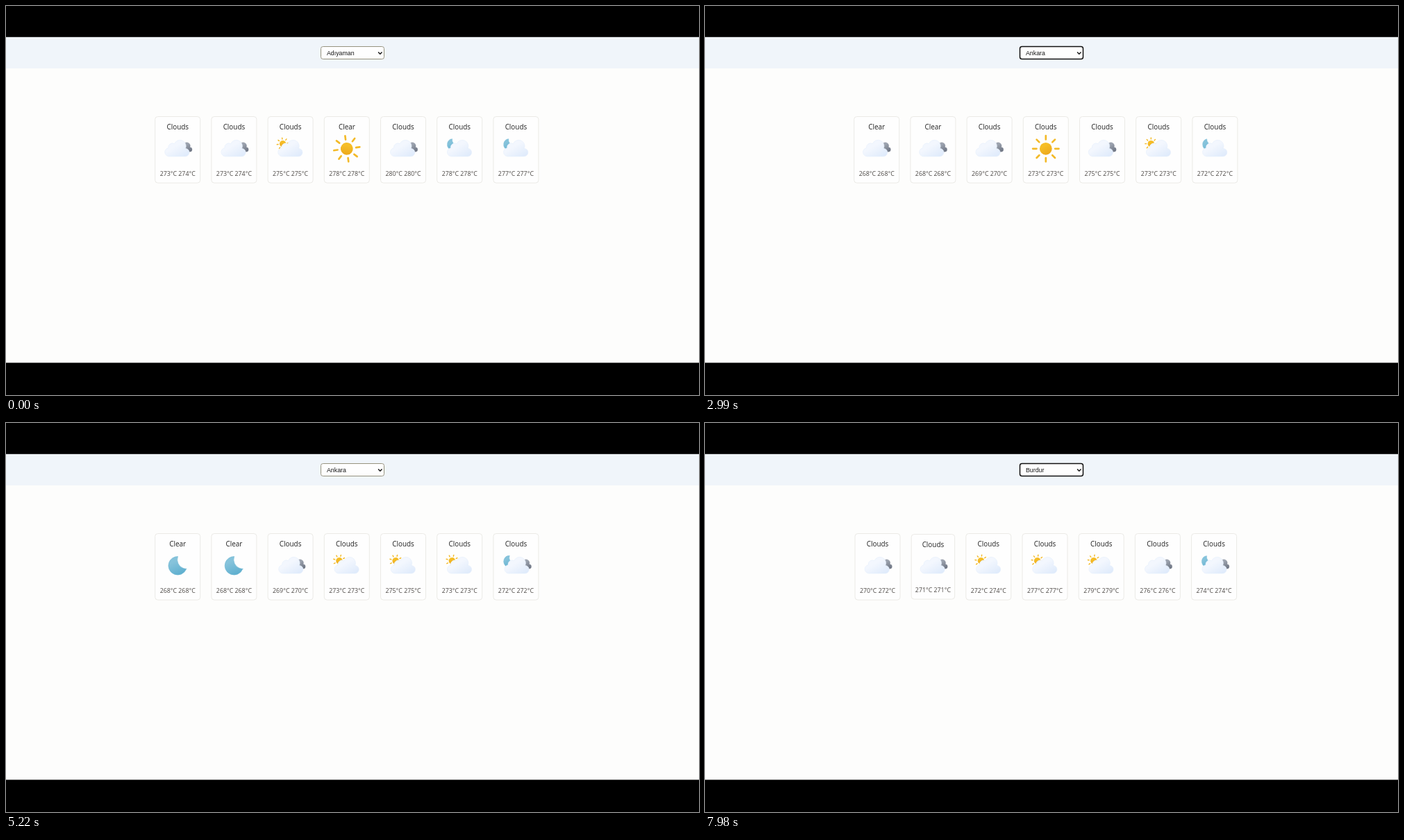
These frames come from a looping animation (998x561 px, 8000 ms). An HTML page with a canvas:

```html
<!DOCTYPE html>
<html lang="en">
<head>
<meta charset="utf-8">
<title>Weather</title>
<style>
  html, body { margin: 0; width: 100%; height: 100%; overflow: hidden; background: #000; }
  canvas { display: block; width: 998px; height: 561px; }
</style>
</head>
<body>
<canvas id="stage"></canvas>
<script>
const W = 998, H = 561, LOOP = 8000, CYCLE = 6000;
const ROW_X = 490.8, GAP = 16.2, CARD_W = 65, ICON_Y = 205.8;
const UNIT = 0.1035;   // icon units (512 box) to pixels

const canvas = document.getElementById('stage');
const dpr = window.devicePixelRatio || 1;
canvas.width = Math.round(W * dpr);
canvas.height = Math.round(H * dpr);
const ctx = canvas.getContext('2d');

const CLOUD = new Path2D('M291 107A84 84 0 00135.6 43 56 56 0 0051.8 100 60 60 0 0063 219H287a56 56 0 000-112Z');

// disc of radius 132 with a round bite taken out of the upper right
const MOON = new Path2D();
MOON.arc(0, 0, 132, 0.26, -1.65);
MOON.arc(118, -100, 133, -2.9, 1.46, true);
MOON.closePath();

function gradient(x0, y0, x1, y1, from, to) {
  const g = ctx.createLinearGradient(x0, y0, x1, y1);
  g.addColorStop(0.25, from);
  g.addColorStop(1, to);
  return g;
}
const WHITE = gradient(99, 30, 232, 260, '#f3f7fe', '#deeafb');
const DARK = gradient(99, 30, 232, 260, '#9ca3af', '#6b7280');
const BLUE = gradient(-85, -110, 48, 121, '#86c3db', '#5eafcf');
const GOLD = gradient(-0.5, -0.9, 0.5, 0.9, '#f6be27', '#eca81c');

// each card: title, icon, low, high
const scenes = [
  {
    from: 0, phase: 5000, city: 'Adıyaman',
    cards: ['Clouds over 273 274', 'Clouds over 273 274', 'Clouds sunCloud 275 275', 'Clear sun 278 278',
      'Clouds over 280 280', 'Clouds moonCloud 278 278', 'Clouds moonCloud 277 277']
  },
  {
    from: 2990, phase: 0, city: 'Ankara', focusEnd: 3820,
    loading: ['over', 'over', 'over', 'sun', 'over', 'sunCloud', 'moonCloud'],
    cards: ['Clear moon 268 268', 'Clear moon 268 268', 'Clouds over 269 270', 'Clouds sunCloud 273 273',
      'Clouds sunCloud 275 275', 'Clouds sunCloud 273 273', 'Clouds overNight 272 272']
  },
  {
    from: 6910, phase: 0, city: 'Burdur', focusEnd: LOOP,
    cards: ['Clouds over 270 272', 'Clouds over 271 271', 'Clouds sunCloud 272 274', 'Clouds sunCloud 277 277',
      'Clouds sunCloud 279 279', 'Clouds over 276 276', 'Clouds overNight 274 274']
  }
];

// goes -1, 1, -1 in straight lines over one cycle
const swing = ms => 1 - 2 * Math.abs(1 - 2 * ((ms % CYCLE) / CYCLE));
const turn = ms => (ms % CYCLE) / CYCLE * Math.PI / 4;

function at(x, y, scale, angle, draw) {
  ctx.save();
  ctx.translate(x, y);
  ctx.rotate(angle);
  ctx.scale(scale, scale);
  draw();
  ctx.restore();
}

function shape(path, fill, line) {
  ctx.fillStyle = fill;
  ctx.fill(path);
  ctx.strokeStyle = line;
  ctx.lineWidth = 6;
  ctx.stroke(path);
}

const cloud = x => at(x, 145, 1, 0, () => shape(CLOUD, WHITE, '#e6effc'));
const darkCloud = x => at(x, 174, 0.572, 0, () => shape(CLOUD, DARK, '#848b98'));
const moonAt = (x, y, scale, ms) =>
  at(x, y, scale, swing(ms) * Math.PI / 15, () => shape(MOON, BLUE, '#72b9d5'));

// lengths inside are in disc radii
function sunAt(x, y, r, inner, outer, ms) {
  at(x, y, r, turn(ms), () => {
    ctx.fillStyle = GOLD;
    ctx.beginPath();
    ctx.arc(0, 0, 1, 0, Math.PI * 2);
    ctx.fill();
    ctx.strokeStyle = '#f3ba28';
    ctx.lineWidth = 0.3;
    ctx.lineCap = 'round';
    for (let i = 0; i < 8; i++) {
      ctx.rotate(Math.PI / 4);
      ctx.beginPath();
      ctx.moveTo(0, -inner);
      ctx.lineTo(0, -outer);
      ctx.stroke();
    }
  });
}

const icons = {
  sun: ms => sunAt(256, 256, 86, 1.5, 2.1, ms),
  moon: ms => moonAt(256, 256, 0.97, ms),
  over(ms) {
    darkCloud(264 + 9 * swing(ms));
    cloud(81 + 18 * swing(ms));
  },
  sunCloud(ms) {
    sunAt(151, 187, 46, 1.4, 1.8, ms);
    cloud(81);
  },
  moonCloud(ms) {
    moonAt(166, 198, 0.62, ms);
    cloud(81);
  },
  overNight(ms) {
    moonAt(166, 198, 0.62, ms);
    darkCloud(272 + 4 * swing(ms));
    cloud(90 + 9 * swing(ms));
  }
};

function text(str, x, y, font, color, align) {
  ctx.font = font;
  ctx.fillStyle = color;
  ctx.textAlign = align;
  ctx.fillText(str, x, y);
}

function box(x, y, w, h, r, line, width) {
  ctx.beginPath();
  ctx.roundRect(x, y, w, h, r);
  ctx.fillStyle = '#fefefe';
  ctx.fill();
  ctx.strokeStyle = line;
  ctx.lineWidth = width;
  ctx.stroke();
}

function drawSelect(city, focused) {
  box(453.5, 58.5, 91, 18, 3, focused ? '#111' : '#96937f', focused ? 1.5 : 1);
  text(city, 462, 71, '8.8px "Liberation Sans", Arial, sans-serif', '#151515', 'left');
  ctx.strokeStyle = '#111';
  ctx.lineWidth = 1.4;
  ctx.lineCap = 'butt';
  ctx.beginPath();
  ctx.moveTo(536.1, 66.5);
  ctx.lineTo(538.8, 69.2);
  ctx.lineTo(541.5, 66.5);
  ctx.stroke();
}

function drawCard(x, width, title, label, icon, ms) {
  const inset = (CARD_W - width) / 2;
  const top = 159.5 + inset * 0.8;
  box(x - width / 2, top, width, 414.6 - top * 2, 4, '#ebeae6', 1);
  text(title, x, 177.8 + inset, '9.9px "Open Sans", "Noto Sans", sans-serif', '#222', 'center');
  at(x - 256 * UNIT, ICON_Y - 256 * UNIT, UNIT, 0, () => icons[icon](ms));
  text(label, x, 245.2 - inset * 0.8, '500 8.8px "Open Sans", "Noto Sans", sans-serif', '#4c4845', 'center');
}

// cards sit in a centred row; the narrow digit 1 makes a card slimmer
function drawRow(scene, age) {
  const cards = scene.cards.map(card => {
    const [title, icon, low, high] = card.split(' ');
    const label = `${low}°C ${high}°C`;
    return { title, icon, label, width: CARD_W - 1.3 * (label.split('1').length - 1) };
  });
  const total = cards.reduce((sum, c) => sum + c.width + GAP, -GAP);
  const loading = scene.loading && age < 100;
  let x = ROW_X - total / 2;
  cards.forEach((c, i) => {
    const icon = loading ? scene.loading[i] : c.icon;
    drawCard(x + c.width / 2, c.width, c.title, c.label, icon, age + scene.phase);
    x += c.width + GAP;
  });
}

// the page stands still for a moment before new data arrives
function hold(t) {
  const next = scenes.find(s => s.from > t);
  return next ? Math.min(t, next.from - 275) : t;
}

function draw(now) {
  const t = now % LOOP;
  const scene = scenes.filter(s => t >= s.from).pop();

  ctx.setTransform(dpr, 0, 0, dpr, 0, 0);
  ctx.fillStyle = '#000';
  ctx.fillRect(0, 0, W, H);
  ctx.fillStyle = '#fdfdfc';
  ctx.fillRect(0, 44.8, W, 469.7);
  ctx.fillStyle = '#f0f5fa';
  ctx.fillRect(0, 45, W, 45);

  drawSelect(scene.city, t < scene.focusEnd);
  drawRow(scene, hold(t) - scene.from);
}

let start;
function tick(now) {
  if (start === undefined) start = now;
  draw(now - start);
  requestAnimationFrame(tick);
}
draw(0);
requestAnimationFrame(tick);
</script>
</body>
</html>
```
